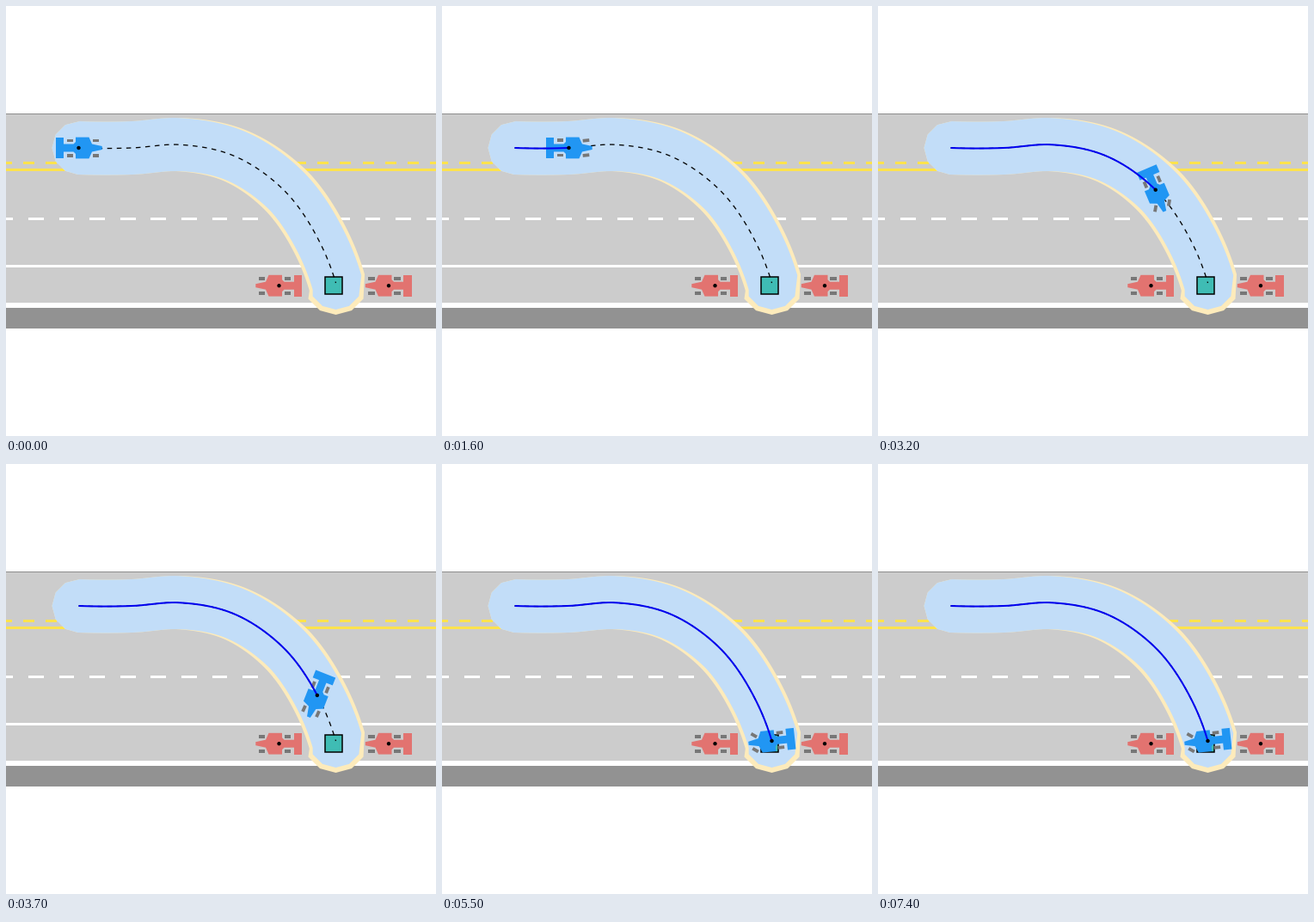
These frames come from a looping animation (500x500 px, 7.5 s). A matplotlib script:

```python
import numpy as np
import matplotlib.pyplot as plt
from matplotlib.animation import FuncAnimation
from matplotlib.patches import Circle, Polygon, Rectangle

SIZE, DPI, FRAMES, STEP = 500, 100, 75, 100
PX = 72 / DPI
YELLOW = "#ffe34d"

fig = plt.figure(figsize=(SIZE / DPI, SIZE / DPI), dpi=DPI, facecolor="white")
ax = fig.add_axes([0, 0, 1, 1])
ax.set(xlim=(0, SIZE), ylim=(SIZE, 0))
ax.axis("off")


def spline(t, keys, vals, flat_ends=False):
    """Cubic Hermite curve through key values (scalars or points)."""
    keys, vals = np.asarray(keys, float), np.asarray(vals, float)
    slope = np.gradient(vals, keys, axis=0, edge_order=2)
    if flat_ends:
        slope[[0, -1]] = 0
    t = np.clip(np.asarray(t, float), keys[0], keys[-1])
    i = np.clip(np.searchsorted(keys, t, side="right") - 1, 0, len(keys) - 2)
    h = keys[i + 1] - keys[i]
    u = (t - keys[i]) / h
    if vals.ndim > 1:
        h, u = h[..., None], u[..., None]
    blend = u * u * (3 - 2 * u)
    return (vals[i] + blend * (vals[i + 1] - vals[i])
            + h * u * (1 - u) * ((1 - u) * slope[i] - u * slope[i + 1]))


# Planned route, measured along its chords
NODES = np.array([(84.5, 165), (146.5, 165), (201, 161.2), (262, 173),
                  (323, 214), (365, 275), (383.5, 322)])
CHORD = np.r_[0, np.cumsum(np.hypot(*np.diff(NODES, axis=0).T))]
END = CHORD[-1]
along = np.linspace(0, END, 240)
route = spline(along, CHORD, NODES)

# Speeds up evenly until BRAKE, then slows evenly until STOP
ACCEL, BRAKE, STOP = 24.6, 3.2, 4.75
TURN_T, TURN = (1.6, 2.4, 3.2, 4.3, 4.8, 5.5), (0, 10, 67, 155, 164, 174)
STEER_T, STEER = (0.8, 1.6, 2.4, 3.2, 4.3, 5.5), (0, -6, 20, 33, -33, 36)


def travelled(t):
    if t <= BRAKE:
        return ACCEL * t**2
    left = max(0, (STOP - t) / (STOP - BRAKE))
    return END - (END - ACCEL * BRAKE**2) * left**2


def band(y0, y1, color, x0=0, x1=SIZE):
    ax.add_patch(Rectangle((x0, y0), x1 - x0, y1 - y0, fc=color, lw=0))


def dashes(y, first, period, color):
    for x in np.arange(first, SIZE, period):
        band(y - 1.5, y + 1.5, color, x, x + period / 2)


# Road
band(125, 346, "#cccccc")
band(125, 126, "#8c8c8c")
band(350, 375, "#929292")
band(345, 351, "white")
band(301.3, 304, "white")
band(189, 192, YELLOW)
dashes(182.6, -6.3, 26.3, YELLOW)
dashes(247, -9.6, 35.6, "white")

# Corridor around the route
tangent = np.gradient(route, axis=0)
tangent /= np.hypot(*tangent.T)[:, None]
normal = np.c_[tangent[:, 1], -tangent[:, 0]]
grow = np.clip((along - 110) / 150, 0, 1)[:, None]


def cap(center, radius, start):
    a = np.radians(np.arange(start, start + 151, 30))
    return center + radius * np.c_[np.cos(a), np.sin(a)]


def corridor(end_width, end_radius, color):
    middle = route + 1.5 * grow * normal
    side = (31 + (end_width - 31) * grow) * normal
    pts = np.vstack([middle + side, cap(route[-1], end_radius, 30)[:5],
                     (middle - side)[::-1], cap(route[0], 31, 120)[:5]])
    ax.add_patch(Polygon(pts, fc=color, lw=0))


corridor(33.5, 37, "#fdebbb")
corridor(29.5, 31, "#c2ddf8")

# Goal marker and dashed route
ax.add_patch(Rectangle((371.2, 315.2), 20.2, 20.2, fc="#3fbcb4", ec="black", lw=1.5 * PX))
length = np.hypot(*np.diff(route, axis=0).T).sum()
WIDTH = 1.3
dash = (length - 1.5) / 34 / 2 / WIDTH
ax.plot(*route.T, color="black", lw=WIDTH * PX, ls=(0, (dash, dash)),
        dash_capstyle="butt")


# Car parts: nose along +x, origin at the dot
def mirrored(half):
    half = np.array(half)
    return np.vstack([half, half[::-1] * (1, -1)])


WING = mirrored([(-26.8, 12.4), (-17.3, 12.4)])
BODY = mirrored([(-18, 4.5), (-6, 4.5), (-3.5, 7), (-3.5, 12.4), (12, 12.4),
                 (15.5, 4.5), (27.2, 2)])
WHEEL = mirrored([(-3.8, 1.9), (3.8, 1.9)])
HUBS = [(x, y) for x in (-10, 20) for y in (-8.6, 8.6)]


def turn(pts, deg):
    c, s = np.cos(np.radians(deg)), np.sin(np.radians(deg))
    return pts @ np.array([[c, s], [-s, c]])


class Car:
    def __init__(self, color, z):
        def part(fc):
            return ax.add_patch(Polygon(WHEEL, fc=fc, lw=0, zorder=z))
        self.wheels = [part("#777777") for _ in HUBS]
        self.wing, self.body = part(color), part(color)
        self.dot = ax.add_patch(Circle((0, 0), 2.2, fc="black", lw=0, zorder=z + 2))

    def place(self, pos, heading, steer=0):
        for wheel, hub in zip(self.wheels, HUBS):
            angle = steer if hub[0] > 0 else 0
            wheel.set_xy(turn(turn(WHEEL, angle) + hub, heading) + pos)
        self.wing.set_xy(turn(WING, heading) + pos)
        self.body.set_xy(turn(BODY, heading) + pos)
        self.dot.center = tuple(pos)


for x in (317.5, 445):
    Car("#e27370", 3).place(np.array([x, 325.2]), 180)

car = Car("#2196f3", 5)
trail, = ax.plot([], [], color="#0000f0", lw=2 * PX, zorder=6, solid_capstyle="butt")


def update(i):
    t = i * STEP / 1000
    s = travelled(t)
    pos = spline([s], CHORD, NODES)[0]
    car.place(pos, spline(t, TURN_T, TURN, True), spline(t, STEER_T, STEER, True))
    trail.set_data(*np.vstack([route[along < s], pos]).T)
    return []


anim = FuncAnimation(fig, update, frames=FRAMES, interval=STEP,
                     repeat=True, repeat_delay=0, blit=False)
plt.show()
```
